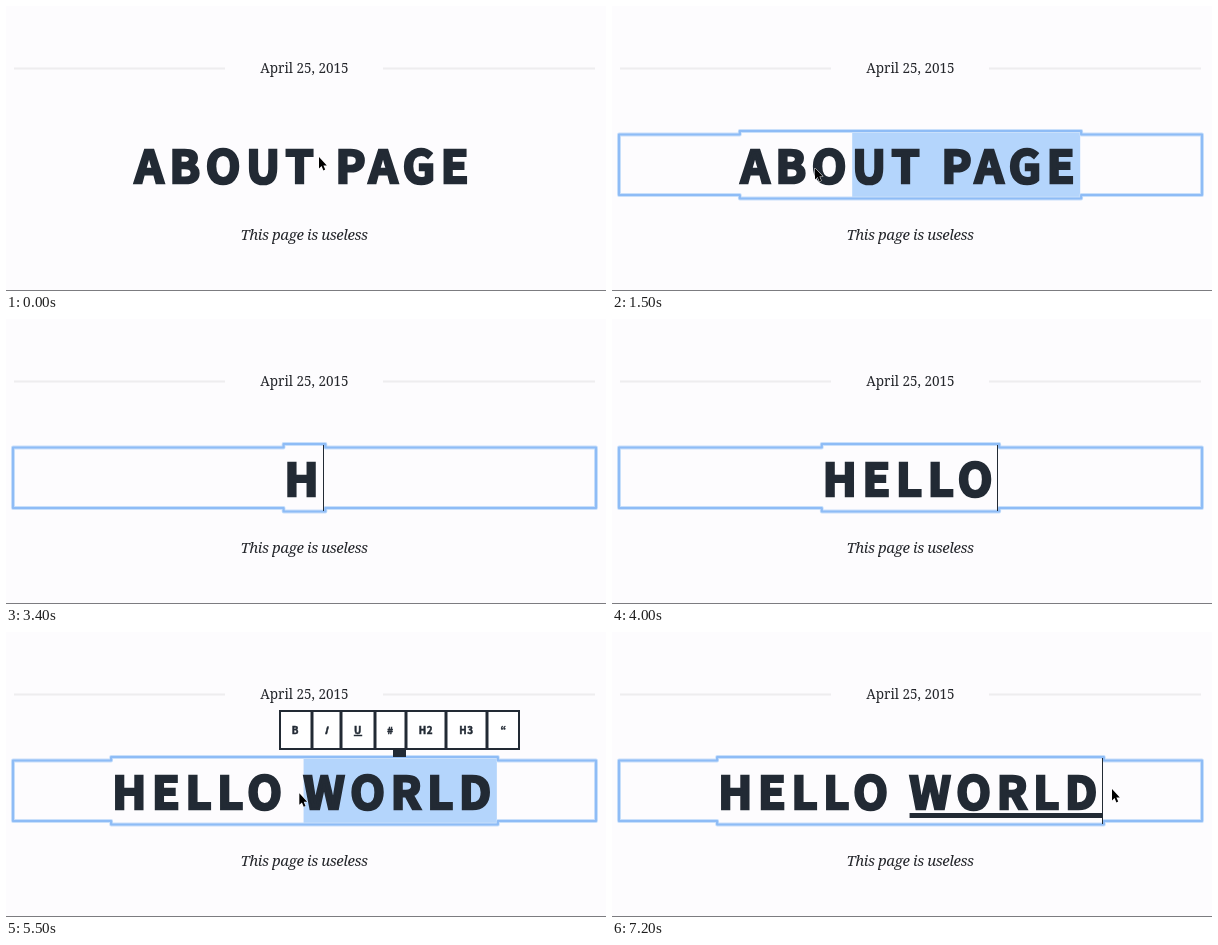
Animation, 600 px wide and 285 px high, one loop 7500 ms. Source, as an HTML page:

```html
<!DOCTYPE html>
<html lang="en">
<head>
<meta charset="utf-8">
<title>Inline title editor</title>
<style>
  html, body { margin: 0; width: 100%; height: 100%; overflow: hidden; background: #fdfcfe; }
  svg { display: block; width: 600px; height: 285px; }
  text { fill: #222a34; text-anchor: middle; white-space: pre; }
  .serif { font-family: "Noto Serif", serif; fill: #24262b; }
  #title, .label { font-family: "Noto Sans CJK JP", "Noto Sans CJK SC", "Noto Sans", sans-serif; font-weight: 700; stroke: #222a34; }
  /* The stroke turns bold into black weight. */
  #title { font-size: 45px; letter-spacing: 5.75px; stroke-width: 2.6px; }
  .label { font-size: 9.8px; letter-spacing: .6px; stroke-width: .5px; }
</style>
</head>
<body>
<svg viewBox="0 0 600 285">
  <rect width="600" height="285" fill="#fdfcfe"/>
  <path d="M8 62.5H219M377 62.5H589" stroke="#eeedef" stroke-width="2"/>
  <text class="serif" x="298.5" y="67" font-size="13.5">April 25, 2015</text>
  <rect id="selection" y="126" height="66" fill="#b4d5fc"/>
  <g fill="none" stroke-linejoin="round">
    <path id="glow" stroke="#c9e0fb" stroke-width="3.8"/>
    <path id="ring" stroke="#8ebcf6" stroke-width="2.2"/>
  </g>
  <text id="title" x="298.5" y="176.8"></text>
  <rect id="underline" y="181" height="5" fill="#222a34"/>
  <rect id="caret" y="126" width="1" height="66" fill="#222a34"/>
  <text class="serif" x="298" y="233.5" font-size="15" font-style="italic" letter-spacing="-.4">This page is useless</text>
  <path d="M0 284.5H600" stroke="#7c7c80"/>
  <g id="toolbar"></g>
  <path id="arrow" d="M0 0V11.5L2.6 9.1L4.4 13.4L6.2 12.6L4.4 8.4H7.8Z" fill="#000" stroke="#fff" stroke-width="1" paint-order="stroke"/>
  <path id="hand" d="M-1.5 8V1Q-1.5 -.5 0 -.5T1.5 1V5Q3.3 4 4.2 5.5Q5.8 4.8 6.4 6.3Q8 6 8 8V10.5L6.5 15H-.5L-4.8 9.6Q-5.5 8 -4 7.5Z M1.6 5V8M4.2 5.6V8.3M6.3 6.5V8.6M1.5 10.5V13M3.4 10.5V13M5.3 10.5V13" fill="#fff" stroke="#111" stroke-width="1" stroke-linejoin="round"/>
</svg>
<script>
const LOOP = 7500, STEP = 100, CENTER = 298.5;
const $ = id => document.getElementById(id);
const set = (el, attrs) => { for (const k in attrs) el.setAttribute(k, attrs[k]); };
const show = (el, on) => { el.style.display = on ? "" : "none"; };
const within = (t, a, b) => t >= a && t < b;

const edges = [0, 33, 62, 96, 127, 167, 208, 241];
const labels = ["B", "I", "U", "#", "H2", "H3", "“"];
const labelStyle = { I: 'font-style="italic"', U: 'text-decoration="underline"' };
$("toolbar").innerHTML =
  `<rect x="114" y="117" width="13" height="8" fill="#222a34"/>
   <rect x="1" y="79" width="239" height="38" fill="#fff" stroke="#222a34" stroke-width="2"/>` +
  edges.slice(1, -1).map(x => `<path d="M${x} 79V117" stroke="#222a34" stroke-width="3"/>`).join("") +
  labels.map((s, i) => `<text class="label" x="${(edges[i] + edges[i + 1]) / 2}" y="102" ${labelStyle[s] || ""}>${s}</text>`).join("") +
  `<rect id="hover" x="62.5" y="79" width="33" height="38" fill="none" stroke="#62b8e6" stroke-width="2.5"/>`;

// Typing is one character per step.
function titleAt(t) {
  if (t < 2700) return "ABOUT PAGE";
  const typed = (s, start) => s.slice(0, Math.max(0, Math.floor((t - start) / STEP)));
  return typed("HELLO", 3300) + typed("\u00a0WORLD", 4000);
}

// Keys are [time, x, y].
const pointerPath = [
  [0, 313, 151], [400, 313, 151], [800, 400, 158], [1200, 466, 162], [1300, 445, 163],
  [1400, 335, 163], [1500, 203, 162], [1600, 140, 162], [1700, 122, 162], [2500, 120, 162],
  [4700, 470, 166], [4900, 487, 164], [5000, 455, 163], [5200, 345, 162], [5400, 294, 162],
  [5700, 292, 160], [6000, 325, 125], [6200, 350, 100], [6500, 350, 100],
  [6700, 430, 150], [6900, 500, 185], [7100, 500, 160], [7200, 500, 157], [7500, 500, 157]
];
function pointerAt(t) {
  const i = pointerPath.findIndex(k => k[0] > t);
  const [a, b] = [pointerPath[i - 1], pointerPath[i]];
  const f = (t - a[0]) / (b[0] - a[0]);
  return [a[1] + (b[1] - a[1]) * f, a[2] + (b[2] - a[2]) * f];
}

function ringPath(left, right) {
  if (right <= left) return "M7 128.5H590V189H7Z";
  const [a, b] = [left - 1, right + 1];
  return `M7 128.5H${a}V125H${b}V128.5H590V189H${b}V192.5H${a}V189H7Z`;
}

// First selected character while dragging; -1 means nothing is selected.
function selectionStart(t) {
  if (within(t, 1300, 2700)) return Math.max(0, 9 - 3 * Math.floor((t - 1300) / STEP));
  if (within(t, 5000, 6900)) return Math.max(6, 10 - Math.floor((t - 5000) / STEP));
  return -1;
}

function caretIndex(t, text) {
  if (within(t, 300, 800)) return 5;
  if (within(t, 1200, 1300)) return text.length;
  if (within(t, 2700, 5000) && !within(t, 3100, 3200) || t >= 6900) return text.length;
  return -1;
}

function render(time) {
  const t = Math.floor(time % LOOP / STEP) * STEP;
  const title = $("title"), text = titleAt(t);
  title.textContent = text;
  const width = text ? title.getComputedTextLength() : 0;
  const left = CENTER - width / 2, right = left + width;
  const charX = i => i <= 0 ? left : i >= text.length ? right : left + title.getSubStringLength(0, i);

  const outline = ringPath(left, right);
  for (const id of ["glow", "ring"]) {
    set($(id), { d: outline, opacity: t < 300 ? .6 : 1 });
    show($(id), t >= 200);
  }

  const start = selectionStart(t);
  show($("selection"), start >= 0);
  if (start >= 0) set($("selection"), { x: charX(start), width: right - charX(start) });

  show($("underline"), t >= 6500);
  if (t >= 6500) set($("underline"), { x: charX(6), width: right - charX(6) });

  const caret = caretIndex(t, text);
  show($("caret"), caret >= 0);
  if (caret >= 0) set($("caret"), { x: Math.round(charX(caret) - 1) });

  const first = within(t, 1800, 2700);
  show($("toolbar"), first || within(t, 5500, 6900));
  set($("toolbar"), { transform: `translate(${first ? 178 : 273})` });
  show($("hover"), within(t, 6200, 6600));

  const [x, y] = pointerAt(t);
  const visible = t < 2500 || t >= 4700, pointing = within(t, 6100, 6600);
  show($("arrow"), visible && !pointing);
  show($("hand"), visible && pointing);
  for (const id of ["arrow", "hand"]) set($(id), { transform: `translate(${x} ${y})` });
}

const began = performance.now();
function tick() {
  render(performance.now() - began);
  requestAnimationFrame(tick);
}
tick();
</script>
</body>
</html>
```
